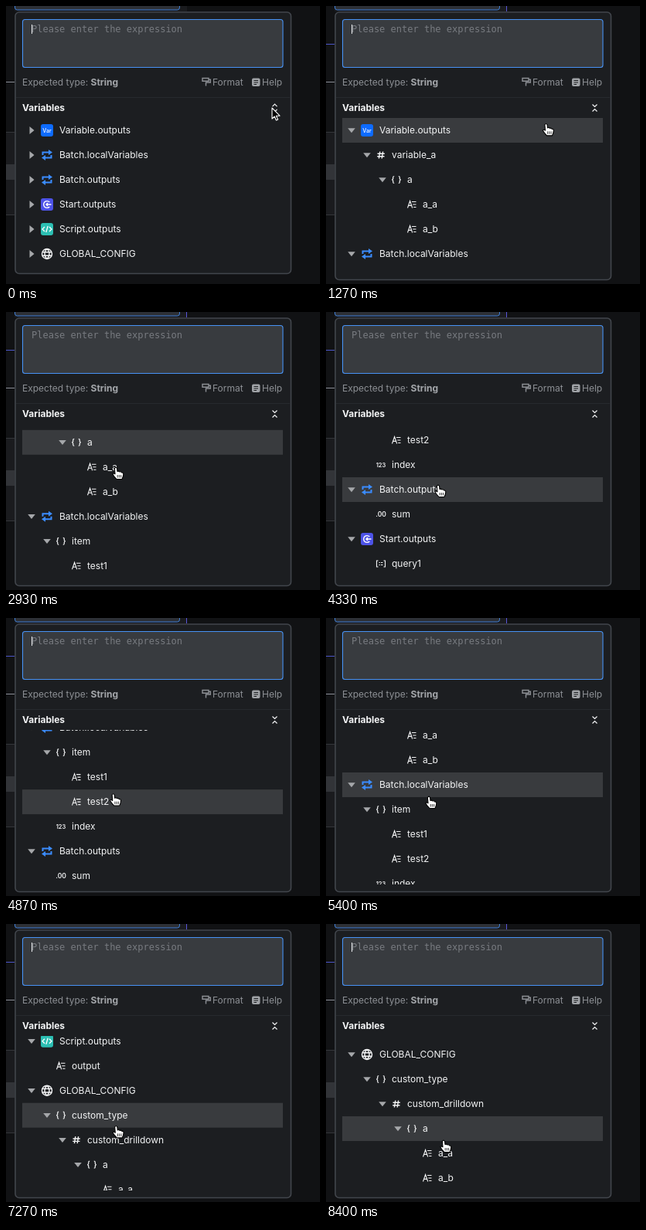
Recreate the animation shown at these times as an HTML page with a canvas. Size 406 by 360 pixels, loop 8470 ms.

```html
<!DOCTYPE html>
<html>
<head>
<meta charset="utf-8">
<style>
html, body { margin: 0; width: 100%; height: 100%; overflow: hidden; background: #111214; }
canvas { display: block; }
</style>
</head>
<body>
<canvas></canvas>
<script>
const LOOP = 8470, EXPAND = 1000, ROW = 32, TOP = 145;
const canvas = document.querySelector('canvas'), c = canvas.getContext('2d');
const dpr = window.devicePixelRatio || 1;
canvas.width = 406 * dpr;
canvas.height = 360 * dpr;
canvas.style.cssText = 'width:406px;height:360px';
const SANS = 'Inter, sans-serif', MONO = '"DejaVu Sans Mono", monospace';
const WHITE = '#f3f4f5', GREY = '#8d9095';

// level, icon, label
const tree = [
  [0, 'var', 'Variable.outputs'], [1, '#', 'variable_a'], [2, '{}', 'a'], [3, 'str', 'a_a'], [3, 'str', 'a_b'],
  [0, 'batch', 'Batch.localVariables'], [1, '{}', 'item'], [2, 'str', 'test1'], [2, 'str', 'test2'], [1, '123', 'index'],
  [0, 'batch', 'Batch.outputs'], [1, '.00', 'sum'],
  [0, 'start', 'Start.outputs'], [1, 'list', 'query1'],
  [0, 'script', 'Script.outputs'], [1, 'str', 'output'],
  [0, 'globe', 'GLOBAL_CONFIG'], [1, '{}', 'custom_type'], [2, '#', 'custom_drilldown'], [3, '{}', 'a'],
  [4, 'str', 'a_a'], [4, 'str', 'a_b']
];
const roots = tree.filter(row => !row[0]);

// time, value...
const scrollKeys = [[2100, 0], [2200, 4], [2830, 37], [2930, 56], [3400, 150], [4000, 235], [4330, 251], [4550, 251],
  [5200, 105], [5450, 105], [6400, 404], [6530, 406], [6800, 406], [7700, 504]];
const cursorKeys = [[1050, 344, 132], [1800, 142, 201], [2950, 142, 201], [4200, 145, 224], [4400, 145, 224],
  [5300, 133, 231], [5450, 133, 231], [6400, 132, 222], [6700, 132, 222], [7700, 150, 291], [7870, 150, 291], [8300, 152, 280]];

function at(keys, t, col = 1) {
  const i = keys.findIndex(k => k[0] > t);
  if (i === 0) return keys[0][col];
  if (i < 0) return keys[keys.length - 1][col];
  const a = keys[i - 1], b = keys[i];
  return a[col] + (b[col] - a[col]) * (t - a[0]) / (b[0] - a[0]);
}

function rect(x, y, w, h, color) {
  c.fillStyle = color;
  c.fillRect(x, y, w, h);
}
function box(x, y, w, h, r, fill, stroke, line = 1) {
  c.beginPath();
  c.roundRect(x, y, w, h, r);
  if (fill) { c.fillStyle = fill; c.fill(); }
  if (stroke) { c.strokeStyle = stroke; c.lineWidth = line; c.stroke(); }
}
function text(str, x, y, color = WHITE, font = '12px ' + SANS, align = 'left') {
  c.font = font;
  c.textAlign = align;
  c.fillStyle = color;
  c.fillText(str, x, y);
}
function line(d, color = WHITE, width = 1.2) {
  c.strokeStyle = color;
  c.lineWidth = width;
  c.stroke(new Path2D(d));
}
function fill(d, color = WHITE) {
  c.fillStyle = color;
  c.fill(new Path2D(d));
}
function place(x, y, draw) {
  c.save();
  c.translate(x, y);
  draw();
  c.restore();
}
const tile = color => box(-8, -8, 16, 16, 3, color);
const glyph = (str, size, y) => text(str, 0, y, WHITE, `600 ${size}px ${SANS}`, 'center');

const icons = {
  var() { tile('#0d6bff'); text('Var', 0, 2.5, '#fff', '500 7px ' + SANS, 'center'); },
  batch() {
    line('M-5.5 0V-3.5H3M5.5 0V3.5H-3', '#3b8cff', 2);
    fill('M2-7L7-3.5L2 0ZM-2 7L-7 3.5L-2 0Z', '#3b8cff');
  },
  start() { tile('#4d53e8'); line('M3.3-3A4.4 4.4 0 1 0 3.3 3M5.5 0H-1M1-2L-1 0L1 2', '#fff', 1.4); },
  script() { tile('#2cbfb3'); line('M-3-3L-6 0L-3 3M3-3L6 0L3 3M1.2-4L-1.2 4', '#fff', 1.3); },
  globe() {
    line('M-6.5 0A6.5 6.5 0 1 1 6.5 0A6.5 6.5 0 1 1-6.5 0M-6 -2.3H6M-6 2.3H6M0-6.5C-4-3-4 3 0 6.5C4 3 4-3 0-6.5', WHITE, 1.4);
  },
  '#'() { line('M-1.2-4.5L-2.6 4.5M2.6-4.5L1.2 4.5M-4.5-1.7H4.8M-4.8 1.7H4.5', WHITE, 1.4); },
  '{}'() {
    line('M-2.8-4.5Q-4.3-4.5-4.3-3V-1.3L-5.3 0L-4.3 1.3V3Q-4.3 4.5-2.8 4.5M2.8-4.5Q4.3-4.5 4.3-3V-1.3L5.3 0L4.3 1.3V3Q4.3 4.5 2.8 4.5');
  },
  str() { line('M-5.5 4.5L-2.4-4.5L.7 4.5M-4.4 1.4H-.4M0-3.5H5.5M1.3 0H5.5M2.2 3.5H5.5', WHITE, 1.1); },
  '123'() { glyph('123', 7.5, 2.8); },
  '.00'() { glyph('.00', 8.5, 3); },
  list() { line('M-3.5-4H-5.5V4H-3.5M3.5-4H5.5V4H3.5M-2.5-1.5H-1M0-1.5H2.5M-2.5 1.5H-1M0 1.5H2.5', WHITE, 1.1); }
};

function backdrop(t) {
  rect(0, 0, 406, 360, '#111214');
  rect(0, 163, 11, 108, '#1a1b1e');
  rect(0, 163, 11, 1, '#34363a');
  rect(0, 205, 11, 20, '#323438');
  rect(0, 270, 11, 1, '#34363a');
  rect(0, 98, 11, 1, '#8b8e96');
  rect(11, 0, 223, 7, '#1a1b1e');
  box(11.5, -10, 213, 15, 3, '#2d3036', '#3f7fd6');
  if (t > 470) {
    rect(0, 49, 11, 1, '#4b55c8');
    rect(233, 0, 1, 7, '#5a55d8');
  }
}

function panel(t, open) {
  box(12, 8, 356.5, open ? 346.5 : 338.5, 5, '#1c1e21', '#42464c', 1.6);
  box(21.5, 17.5, 336.5, 62, 3, '#383b3f', '#4792f5', 1.1);
  text('Please enter the expression', 33, 34, '#787b80', '12px ' + MONO);
  if ((t / 1200 + .25) % 1 < .5) rect(33, 24, 1, 12, '#e8e9eb');
  text('Expected type: ', 21, 103, GREY);
  const w = c.measureText('Expected type: ').width;
  text('String', 21 + w, 103, '#a4a7ab', '700 12px ' + SANS);
  text('Format', 267, 103, GREY);
  text('Help', 331, 103, GREY);
  place(259, 98, () => line('M-5-4.5H3V-.8H-5ZM3-2.7H5.3V1H-.5V2.5M-.5 2V5.5', GREY, 1.4));
  box(318, 93.5, 10.5, 10.5, 2, '#a0a3a7');
  line('M320.5 96.5H326M320.5 99H326M320.5 101.5H324', '#1c1e21', 1);
  rect(13, 118, 355, 1, '#272a2e');
  text('Variables', 21, 136, WHITE, '700 12px ' + SANS);
  place(347.5, 132, () => line(open ? 'M-3-4.5L0-1.5L3-4.5M-3 4.5L0 1.5L3 4.5' : 'M-3-1.8L0-4.8L3-1.8M-3 1.8L0 4.8L3 1.8'));
}

function list(t, open, mx, my) {
  const rows = open ? tree : roots, scroll = at(scrollKeys, t);
  // the highlight trails the scroll a little
  const hover = my < TOP || mx > 358 ? -1 : Math.floor((my - TOP + at(scrollKeys, t - 100)) / ROW);
  c.save();
  c.beginPath();
  c.rect(12, TOP, 356, 200);
  c.clip();
  rows.forEach(([level, icon, label], i) => {
    const y = TOP + i * ROW - scroll;
    if (y < TOP - ROW || y > 345) return;
    const mid = y + 16, next = rows[i + 1];
    if (i === hover) rect(21, y, 337, ROW, '#393b3e');
    const parent = !open || next && next[0] > level;
    if (parent) place(33 + 20 * level, mid, () => fill(open ? 'M-4.8-2.8H4.8L0 3.2Z' : 'M-2.5-5L3.5 0L-2.5 5Z', '#a5a7aa'));
    place(level ? 51 + 20 * level : 53, mid, icons[icon]);
    text(label, level ? 65 + 20 * level : 69, mid + 4);
  });
  c.restore();
}

function pointer(x, y) {
  place(x, y, () => {
    const hand = y >= TOP && x < 358;
    const shape = hand
      ? 'M-1.6 1.5Q0-1.2 1.6 1.5L2 5.5Q4 4.5 4.8 6Q6.8 5.2 7.6 7Q9.8 6.6 9.8 9L9.3 12L8 15.5H1L-2 12L-4.2 8.8Q-3.5 7-1 8.8Z'
      : 'M0 0V14L3.2 11L5.4 16L7.6 15L5.4 10.2H10Z';
    c.lineJoin = 'round';
    fill(shape, hand ? '#fff' : '#000');
    line(shape, hand ? '#000' : '#fff', 1.1);
    if (hand) line('M2.2 10V13.5M4.4 10V13.5M6.6 10V13.5', '#000', .8);
  });
}

function frame(now) {
  const t = now % LOOP, open = t >= EXPAND;
  const x = at(cursorKeys, t), y = at(cursorKeys, t, 2);
  c.setTransform(dpr, 0, 0, dpr, 0, 0);
  backdrop(t);
  panel(t, open);
  list(t, open, x, y);
  pointer(x, y);
  requestAnimationFrame(frame);
}
requestAnimationFrame(frame);
</script>
</body>
</html>
```
